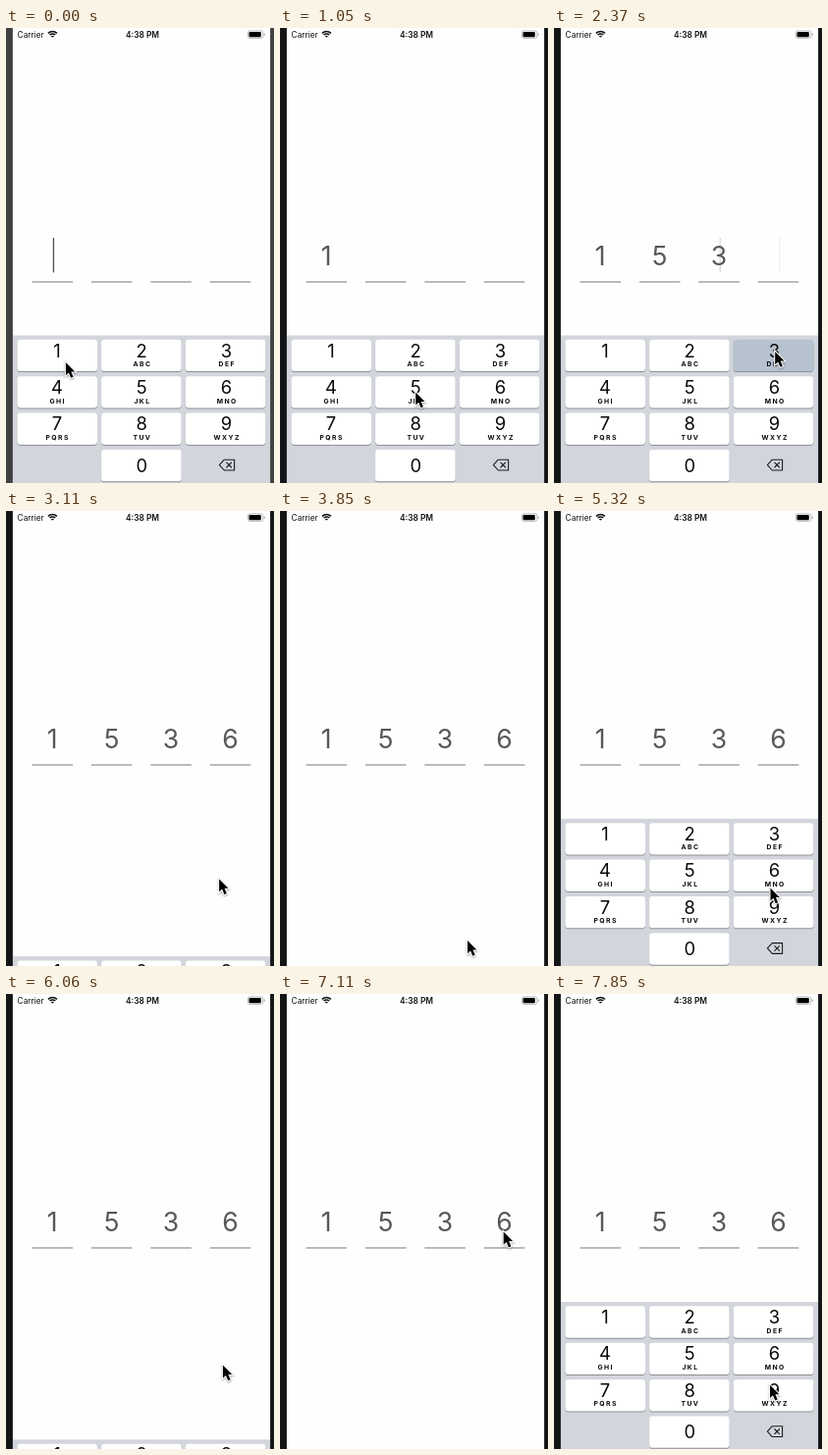
Recreate the animation shown at these times as an HTML page with a canvas. Size 273 px wide and 464 px high, loop 8 s.

```html
<!DOCTYPE html>
<html lang="en">
<head>
<meta charset="utf-8">
<title>Passcode entry</title>
<style>
html, body { margin: 0; width: 100%; height: 100%; overflow: hidden; background: #fff; }
canvas { display: block; width: 100vw; height: 100vh; }
</style>
</head>
<body>
<canvas id="stage"></canvas>
<script>
const W = 273, H = 464, LOOP = 8000, STEP = 148.1;
const LEFT = 7, RIGHT = 269;
const BOARD_TOP = 313.5, BOARD_HEIGHT = 152, ROW = 37.4;
const FONT = 'Inter, Roboto, sans-serif';
const LETTERS = ['', 'ABC', 'DEF', 'GHI', 'JKL', 'MNO', 'PQRS', 'TUV', 'WXYZ'];

const canvas = document.getElementById('stage');
const ctx = canvas.getContext('2d');
const dpr = window.devicePixelRatio || 1;
canvas.width = W * dpr;
canvas.height = H * dpr;

const clamp = v => Math.max(0, Math.min(1, v));
const fieldX = i => 47.2 + 60.4 * i;
const labelX = col => 51.9 + 86.3 * col;

// pointer position on a key, nudged from its centre
function onKey(key, dx = 0, dy = 0) {
  const col = (key - 1) % 3, row = Math.floor((key - 1) / 3);
  return [labelX(col) + dx, 332 + ROW * row + dy];
}

// The pointer's visits. It leaves a stop shortly after tapping there.
const STOPS = [
  { at: 0, spot: onKey(1, 9, 9), tap: 430, key: 1 },
  { at: 1035, spot: onKey(5, 0, 2), tap: 1045, key: 5 },
  { at: 2220, spot: onKey(3, 0.7, -2), tap: 2350, key: 3 },
  { at: 2800, spot: onKey(6, -5, 0), tap: 2800, key: 6 },
  { at: 3850, spot: [191, 438] },
  { at: 4590, spot: [230, 230], tap: 4720 },
  { at: 5331, spot: onKey(6, -4, 15), tap: 5760, key: 6 },
  { at: 6660, spot: [224, 335] },
  { at: 7200, spot: [228, 235], tap: 7260 },
  { at: 7849, spot: onKey(9, -4.5, -8) }
];
const TAPS = STOPS.filter(s => s.tap);
const TYPED = TAPS.filter(s => s.key).slice(0, 4);
const FULL = TYPED[3].tap;

function pointerAt(t) {
  const i = Math.max(1, STOPS.findIndex(s => s.at > t));
  const to = t >= STOPS.at(-1).at ? STOPS.at(-1) : STOPS[i];
  const from = STOPS[STOPS.indexOf(to) - 1];
  const leave = from.tap ? from.tap + 150 : from.at;
  const p = clamp((t - leave) / (to.at - leave));
  const e = p * p * (3 - 2 * p);
  return from.spot.map((v, axis) => v + (to.spot[axis] - v) * e);
}

// A full code hides the keyboard, a tap on a field brings it back.
function keyboardOffset(t) {
  const delay = s => s.tap + (s.key ? 60 : 130);
  const cause = TAPS.filter(s => s.tap >= FULL && delay(s) <= t).pop();
  if (!cause) return 0;
  const w = (t - delay(cause)) * 0.017;
  const left = (1 + w) * Math.exp(-w);
  return BOARD_HEIGHT * (cause.key ? 1 - left : left);
}

function text(str, x, y, size, weight, color, align = 'center', spacing = 0) {
  ctx.font = `${weight} ${size}px ${FONT}`;
  ctx.letterSpacing = spacing + 'px';
  ctx.textAlign = align;
  ctx.fillStyle = color;
  ctx.fillText(str, x + spacing / 2, y);
}

function rounded(x, y, w, h, r, color) {
  ctx.fillStyle = color;
  ctx.beginPath();
  ctx.roundRect(x, y, w, h, r);
  ctx.fill();
}

function polygon(points) {
  ctx.beginPath();
  points.forEach(([x, y]) => ctx.lineTo(x, y));
  ctx.closePath();
}

function drawBezel(t) {
  const active = t >= 140;
  ctx.fillStyle = active ? '#131415' : '#404041';
  ctx.fillRect(0, 0, LEFT, H);
  ctx.fillRect(RIGHT, 0, W - RIGHT, H);
  ctx.fillStyle = active ? '#2b2c2d' : '#555';
  ctx.fillRect(LEFT - 1, 0, 1, H);
  ctx.fillRect(RIGHT, 0, 1, H);
}

function drawStatus() {
  text('Carrier', 11.6, 9.9, 8.25, 400, '#111', 'left');
  text('4:38 PM', 139, 9.9, 8.4, 600, '#111');
  ctx.strokeStyle = ctx.fillStyle = '#111';
  ctx.lineWidth = 1.5;
  for (const r of [6.4, 4, 1.4]) {
    ctx.beginPath();
    ctx.arc(47.4, 9.9, r, -Math.PI * 0.75, -Math.PI * 0.25);
    ctx.stroke();
  }
  ctx.strokeStyle = '#9a9a9a';
  ctx.lineWidth = 0.7;
  ctx.beginPath();
  ctx.roundRect(246.4, 2.9, 15.4, 7.4, 1.9);
  ctx.stroke();
  rounded(247.5, 4, 12.3, 5.2, 1, '#000');
  rounded(262.7, 5.3, 0.9, 2.6, 0.4, '#9a9a9a');
}

function caretAlpha(age, left) {
  const phase = age % 1000;
  const blink = Math.max(clamp((600 - phase) / 150), clamp((phase - 850) / 150));
  return clamp(age / 250) * clamp(left / 200) * blink;
}

function drawFields(t) {
  TYPED.forEach(({ key, tap }, i) => {
    const x = fieldX(i);
    ctx.fillStyle = '#a5a5a6';
    ctx.fillRect(x - 20.7, 258.2, 41.6, 1.5);
    if (t >= tap) text(key, x, 241.6, 26.6, 400, '#58585a');

    const start = i ? TYPED[i - 1].tap : -250;
    if (t < start) return;
    ctx.globalAlpha = caretAlpha(t - start, tap + 60 - t);
    ctx.fillStyle = '#4c4c4e';
    ctx.fillRect(x + 0.6, 214, 1.3, 35.3);
    ctx.globalAlpha = 1;
  });
}

function drawDelete() {
  ctx.strokeStyle = '#1c1c1e';
  ctx.lineWidth = 1.1;
  ctx.lineJoin = ctx.lineCap = 'round';
  polygon([[217.4, 445.6], [222.3, 440.2], [232.6, 440.2], [232.6, 451], [222.3, 451]]);
  ctx.stroke();
  for (const side of [-2.4, 2.4]) {
    ctx.beginPath();
    ctx.moveTo(227.2 - side, 443.2);
    ctx.lineTo(227.2 + side, 448);
    ctx.stroke();
  }
}

function drawKey(digit, letters, col, row, pressed) {
  const x = 11.4 + col * 85.7, y = 317.8 + row * ROW, mid = labelX(col);
  rounded(x, y + 1, 81.6, 32.3, 3.4, '#8d9097');
  rounded(x, y, 81.6, 32.3, 3.4, pressed ? '#b6c2d0' : '#fff');
  text(digit, mid, y + (row === 3 ? 22.5 : 17.7), 18.4, 400, '#0a0a0a');
  text(letters, mid, y + 27.3, 6.8, 700, '#0a0a0a', 'center', 1.45);
}

function drawKeyboard(t) {
  const offset = keyboardOffset(t);
  if (offset > 150.5) return;
  ctx.save();
  ctx.translate(0, offset);
  ctx.fillStyle = '#d2d5dc';
  ctx.fillRect(LEFT, BOARD_TOP, RIGHT - LEFT, BOARD_HEIGHT);
  LETTERS.forEach((letters, i) => {
    const pressed = TAPS.some(s => s.key === i + 1 && t >= s.tap && t < s.tap + 130);
    drawKey(i + 1, letters, i % 3, Math.floor(i / 3), pressed);
  });
  drawKey(0, '', 1, 3, false);
  drawDelete();
  ctx.restore();
}

function drawPointer(t) {
  ctx.save();
  ctx.translate(...pointerAt(t));
  ctx.scale(0.94, 0.94);
  polygon([[0, 0], [0, 14], [3.2, 11.1], [5.6, 16.8], [8.2, 15.7], [5.8, 10.1], [10, 10.1]]);
  ctx.shadowColor = 'rgba(0,0,0,.35)';
  ctx.shadowBlur = 2 * dpr;
  ctx.shadowOffsetY = dpr;
  ctx.lineJoin = 'miter';
  ctx.strokeStyle = '#fff';
  ctx.lineWidth = 2.3;
  ctx.stroke();
  ctx.shadowColor = 'transparent';
  ctx.fillStyle = '#000';
  ctx.fill();
  ctx.restore();
}

function draw(t) {
  ctx.setTransform(dpr, 0, 0, dpr, 0, 0);
  ctx.fillStyle = '#fefefe';
  ctx.fillRect(0, 0, W, H);
  drawStatus();
  drawFields(t);
  drawKeyboard(t);
  drawBezel(t);
  drawPointer(t);
}

// The screen updates in steps, like a slow capture.
function tick() {
  const t = performance.now() % LOOP;
  draw(Math.min(53, Math.floor((t + 25) / STEP)) * STEP);
  requestAnimationFrame(tick);
}
tick();
</script>
</body>
</html>
```
